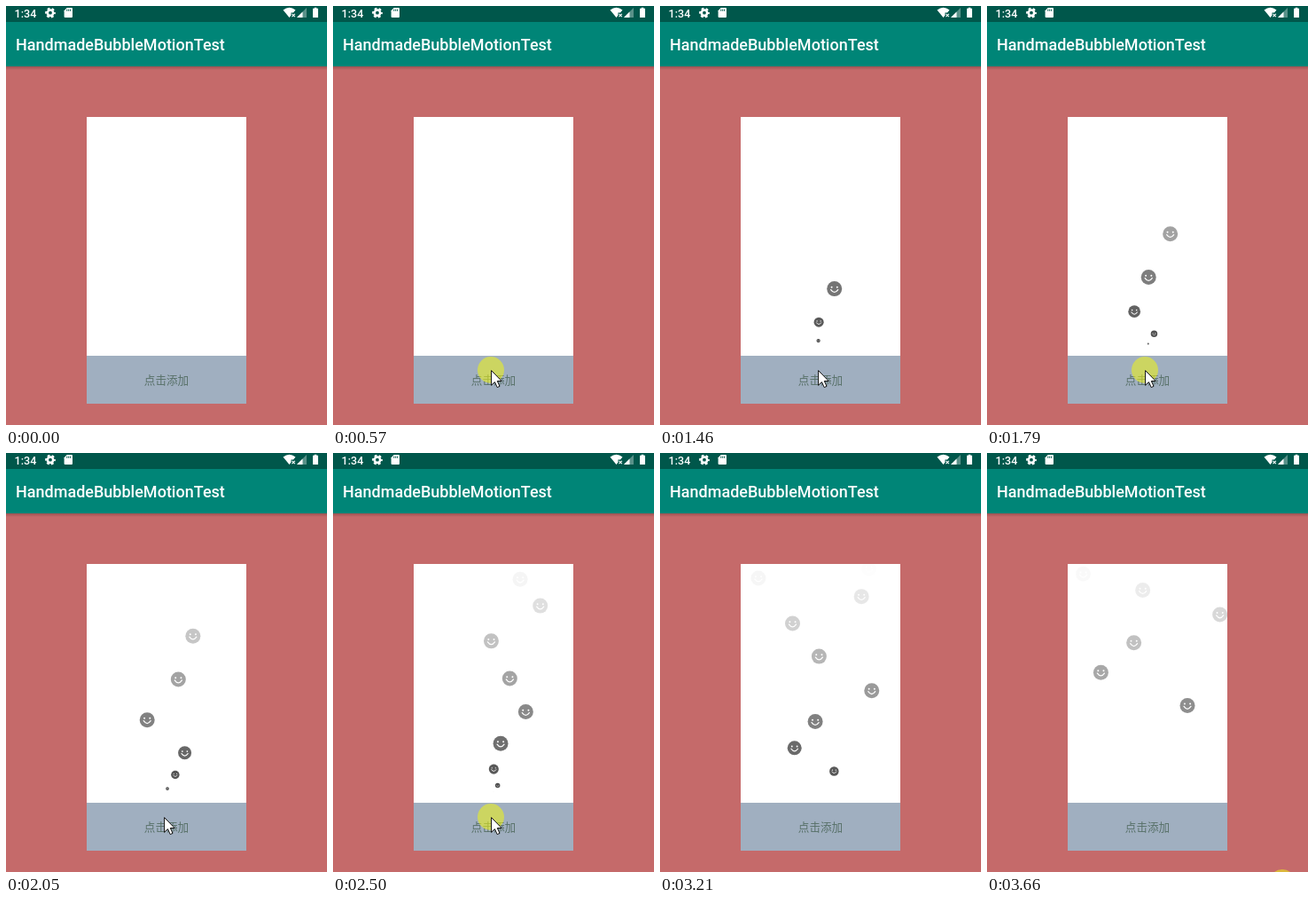
Write an HTML page that moves like this. It is 362x472 px and loops after 3730 ms.

```html
<!DOCTYPE html>
<html lang="zh">
<head>
<meta charset="utf-8">
<title>Floating faces</title>
<style>
  html, body { margin: 0; width: 100%; height: 100%; overflow: hidden; background: #c56a6a; }
  svg { display: block; width: 362px; height: 472px; }
  text { font-family: Roboto, sans-serif; font-weight: 500; fill: #fff; }
  .add { font: 400 12.6px "Noto Sans CJK SC", "Noto Sans CJK", sans-serif; fill: #587169; text-anchor: middle; }
</style>
</head>
<body>
<svg viewBox="0 0 362 472" xmlns="http://www.w3.org/2000/svg">
  <defs>
    <linearGradient id="shade" x2="0" y2="1">
      <stop stop-color="#000" stop-opacity=".22"/>
      <stop offset="1" stop-color="#000" stop-opacity="0"/>
    </linearGradient>
    <clipPath id="panel"><rect x="91" y="125" width="180" height="323"/></clipPath>
    <g id="face">
      <circle r="8.5" fill="#474747"/>
      <circle cx="-3.1" cy="-1.9" r="1" fill="#fff"/>
      <circle cx="3.1" cy="-1.9" r="1" fill="#fff"/>
      <path d="M-4 1Q0 6.6 4 1" fill="none" stroke="#fff" stroke-width="1.3" stroke-linecap="round"/>
    </g>
  </defs>

  <rect width="362" height="472" fill="#c56a6a"/>
  <rect y="68" width="362" height="4" fill="url(#shade)"/>
  <rect width="362" height="68" fill="#008577"/>
  <rect width="362" height="18" fill="#00574b"/>

  <text x="9.5" y="12.6" font-size="12.6">1:34</text>
  <g fill="#fff">
    <circle cx="50" cy="7.7" r="3.2" fill="none" stroke="#fff" stroke-width="2.6"/>
    <circle cx="50" cy="7.7" r="5" fill="none" stroke="#fff" stroke-width="1.8" stroke-dasharray="2.8 2.436" stroke-dashoffset="1.4"/>
    <path d="M68.7 2H74q1 0 1 1v9q0 1-1 1h-7.400q-1 0-1-1V5.200z"/>
    <path d="M68.800 3.700v2M70.700 3.700v2M72.600 3.700v2" stroke="#00574b"/>
    <path d="M312.500 4.500Q319.500-.800 326.500 4.500L324 7.500H321.500V10.500L319.500 13z"/>
    <path d="M322.500 8.800l3.400 3.400m0-3.400l-3.400 3.400" stroke="#fff" stroke-width="1.100"/>
    <path d="M339 2V13H328z" opacity=".35"/>
    <path d="M334.500 6.500V13H328z"/>
    <path d="M347.700 1.800h2.600v1h1.700v10.200h-6V2.800h1.700z"/>
  </g>
  <text x="11" y="50" font-size="18">HandmadeBubbleMotionTest</text>

  <rect x="91" y="125" width="180" height="269" fill="#fff"/>
  <rect x="91" y="394" width="180" height="54" fill="#a0afc0"/>
  <text class="add" x="181" y="425.600">点击添加</text>

  <g id="faces" clip-path="url(#panel)"></g>
  <g id="pointer">
    <circle id="halo" r="15" fill="#edf318" fill-opacity=".57"/>
    <path d="M.6.600V17.200L4.500 13.600 7.200 19.600 10 18.400 7.300 12.500H12.200z" fill="#fff" stroke="#111" stroke-width="1" stroke-linejoin="round"/>
  </g>
</svg>
<script>
const LOOP = 3730, LIFE = 2000, BEAT = 590 / 9;
const START = { x: 181, y: 382 }, RISE = 252;
const HOME = { x: 178, y: 410 };

// Tap time, then the drift and curl of the path
const taps = [
  [780, 73.5, -44], [1034, -30, 112], [1270, -126, 181], [1488, 160, -244],
  [1680, 135, -94], [1880, 69, -147], [2082, 4, -11], [2278, 160, -72],
  [2460, -15, -12], [2633, -178, 149], [2823, 179, -162]
];

const byId = id => document.getElementById(id);
const clamp = v => Math.max(0, Math.min(1, v));
const show = (el, on) => el.setAttribute("visibility", on ? "visible" : "hidden");
const move = (el, x, y, s = 1) =>
  el.setAttribute("transform", `translate(${x.toFixed(2)} ${y.toFixed(2)}) scale(${s.toFixed(3)})`);

const faces = taps.map(() => {
  const el = document.createElementNS("http://www.w3.org/2000/svg", "use");
  el.setAttribute("href", "#face");
  return byId("faces").appendChild(el);
});

// The screen refreshes in steps, with a few longer holds
function snap(t) {
  if (t < 120) return 0;
  if (t < 570) return 120 + Math.floor((t - 120) / (450 / 7)) * (450 / 7);
  if (t < 770) return 570;
  if (t < 820) return 770;
  if (t < 1020) return 820;
  return 990 + Math.floor((t - 990 + 18) / BEAT) * BEAT;
}

function drawFace(el, [born, drift, curl], t) {
  const age = t - born;
  const alive = age > 30 && age < LIFE;
  show(el, alive);
  if (!alive) return;
  const f = (1 - Math.cos(Math.PI * age / LIFE)) / 2;
  move(el, START.x + f * (drift + curl * f), START.y - RISE * f, clamp((age - 30) / 590));
  el.setAttribute("opacity", (1 - f).toFixed(3));
}

function pointerAt(t) {
  if (t < 120) return null;
  if (t < 2880) {
    const k = (1 - clamp((t - 120) / 450)) ** 3;
    return { x: HOME.x + 58 * k, y: HOME.y + 43 * k };
  }
  if (t < 3160) {
    const k = ((t - 2880) / 280) ** 2;
    return { x: HOME.x + 77 * k, y: HOME.y + 95 * k };
  }
  return t > 3640 ? { x: 333, y: 484 } : null;
}

function draw(time) {
  const t = snap(time);
  faces.forEach((el, i) => drawFace(el, taps[i], t));
  const p = pointerAt(t);
  show(byId("pointer"), p);
  if (p) move(byId("pointer"), p.x, p.y);
  const pressed = t >= 770 && taps.some(([at]) => t > at - 70 && t < at + 20);
  byId("halo").setAttribute("opacity", pressed ? 0 : 1);
}

const begin = performance.now();
function tick() {
  draw((performance.now() - begin) % LOOP);
  requestAnimationFrame(tick);
}
tick();
</script>
</body>
</html>
```
